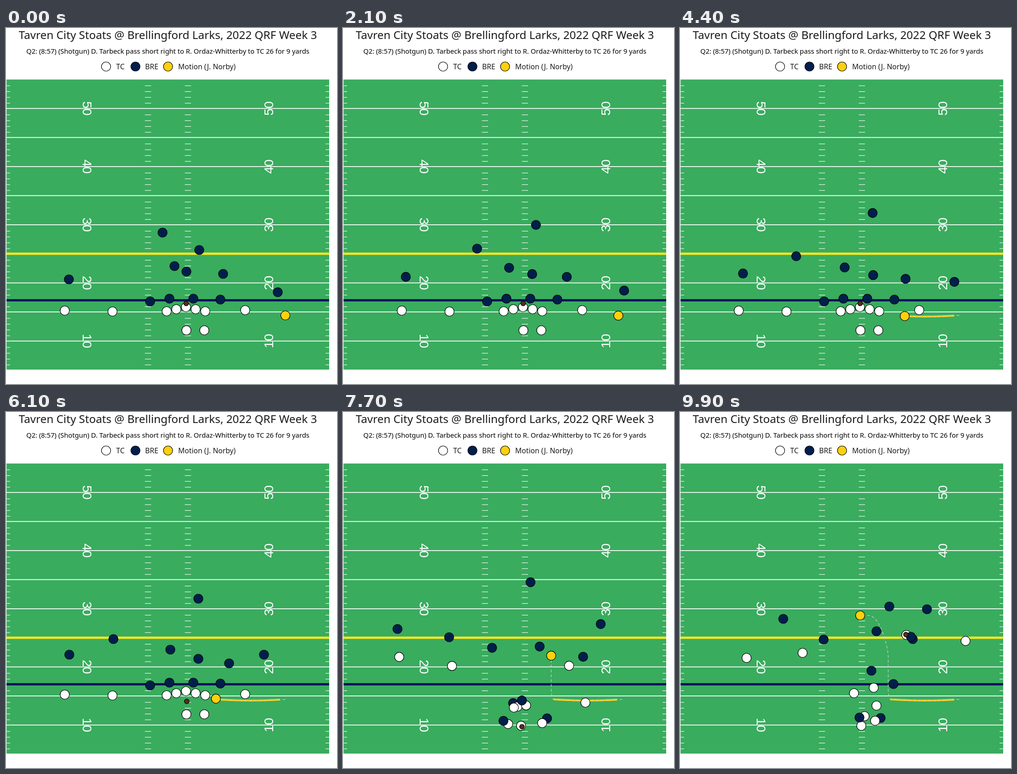
An HTML page that plays this animation: 721x776 px, repeating every 10 s.

```html
<!DOCTYPE html>
<html lang="en">
<head>
<meta charset="utf-8">
<title>Play animation</title>
<style>
  html, body { margin: 0; width: 100%; height: 100%; overflow: hidden; background: #fff; }
  svg { display: block; width: 721px; height: 776px; }
  text { font-family: "Noto Sans", sans-serif; fill: #1a1a1a; }
  .mid { text-anchor: middle; }
  .title { font-size: 24.3px; }
  .sub { font-size: 14.75px; fill: #000; }
  .key { font-size: 15.7px; }
  .num { font: 28px "Liberation Sans", Arial, sans-serif; fill: #fff; text-anchor: middle; }
  .turf { fill: #39ac5e; }
  .line { stroke: #fff; stroke-width: 1.8; }
  .tick { stroke: #fff; stroke-width: 1.1; }
  .scrimmage { stroke: #10105e; stroke-width: 5; }
  .first { stroke: #fbe723; stroke-width: 5; }
  .dot { stroke: #000; stroke-width: 1.2; }
  .off { fill: #fff; }
  .def { fill: #001f4c; }
  .mot { fill: #ffd00d; }
  .ball { fill: #55301a; }
  .trail { fill: none; stroke: #cfcfcf; stroke-width: 1.2; stroke-dasharray: 6 4.5; }
  .shift { fill: none; stroke: #ffd00d; stroke-width: 3.8; }
</style>
</head>
<body>
<svg id="stage" viewBox="0 0 721 776">
  <text class="mid title" x="352.5" y="23.5">Tavren City Stoats @ Brellingford Larks, 2022 QRF Week 3</text>
  <text class="mid sub" x="352.5" y="55.5">Q2: (8:57) (Shotgun) D. Tarbeck pass short right to R. Ordaz-Whitterby to TC 26 for 9 yards</text>
  <circle class="dot off" cx="218" cy="84" r="10"/>
  <text class="key" x="240" y="90">TC</text>
  <circle class="dot def" cx="282" cy="84" r="10"/>
  <text class="key" x="303" y="90">BRE</text>
  <circle class="dot mot" cx="353" cy="84" r="10"/>
  <text class="key" x="375" y="90">Motion (J. Norby)</text>
  <g id="field"></g>
  <g id="play"></g>
</svg>
<script>
// Times in seconds
const LOOP = 10, STEP = 0.1, END = 9.9;
const SNAP = 5.85, BREAK = 6.1, THROW = 7.8, CATCH = 8.56;
const field = document.getElementById('field');
const play = document.getElementById('play');

function add(parent, tag, attrs, text) {
  const el = document.createElementNS('http://www.w3.org/2000/svg', tag);
  for (const k in attrs) el.setAttribute(k, attrs[k]);
  if (text) el.textContent = text;
  parent.appendChild(el);
  return el;
}

// Field: yard lines, hash marks and numbers
const yardY = yard => 175.3 + (50 - yard) * 12.675;
const across = (cls, x1, x2, y) => add(field, 'line', { class: cls, x1, x2, y1: y, y2: y });

add(field, 'rect', { class: 'turf', x: 1.2, y: 112.3, width: 702.8, height: 632.3 });
for (let yard = 6; yard < 55; yard++) {
  const y = yardY(yard);
  if (yard % 5 === 0) { across('line', 1.2, 704, y); continue; }
  for (const [x, w] of [[1.5, 7.5], [302.5, 13.5], [389.5, 13.5], [696, 8]]) across('tick', x, x + w, y + 1.3);
}
for (let yard = 10; yard <= 50; yard += 10) {
  for (const [x, turn] of [[177, 90], [572, -90]]) {
    add(field, 'text', { class: 'num', y: 10, transform: `translate(${x} ${yardY(yard)}) rotate(${turn})` }, String(yard));
  }
}
across('scrimmage', 1.2, 704, 593.5);
across('first', 1.2, 704, 492);

const span = (t, a, b) => Math.min(1, Math.max(0, (t - a) / (b - a)));
const ease = (t, a, b) => { const u = span(t, a, b); return u * u * (3 - 2 * u); };
const mix = (p, q, u) => p.map((v, i) => v + (q[i] - v) * u);
const shiftBy = ([x, y], dx, dy) => [x + dx, y + dy];

// Parabola in time from a to c, passing b just after halfway
const HALF = 0.53;
function arc(a, b, c, u) {
  return a.map((v, i) => {
    const bend = (c[i] - v - (b[i] - v) / HALF) / (1 - HALF);
    return v + (c[i] - v - bend) * u + bend * u * u;
  });
}

const dots = [];
function dot(cls, r, at) {
  dots.push({ el: add(play, 'circle', { class: 'dot ' + cls, r }), at });
  return at;
}

// Last three points are the run; two more in front are a drift before the snap
function run(cls, ...points) {
  const [spot, via, stop] = points.slice(-3);
  const drift = points.length > 3;
  return dot(cls, 10, t => t < BREAK && drift
    ? arc(points[0], points[1], spot, t / BREAK)
    : arc(spot, via, stop, span(t, BREAK, END)));
}
const off = (...points) => run('off', ...points);
const def = (...points) => run('def', ...points);

const shift = add(play, 'polyline', { class: 'shift' });
const trail = add(play, 'polyline', { class: 'trail' });

// Defensive line, behind the blockers
def([356, 590], [377, 633], [417, 564]);
def([467, 592], [441, 677], [437, 667]);

// Offensive line, a shallow wedge around the centre
function blocker(i, via, stop) {
  off([392 + 21 * i, 608.5 + 4.5 * Math.abs(i)], via, stop);
}
blocker(0, [383, 642], [422, 601]);
blocker(-1, [373, 645], [379, 613]);
blocker(1, [400, 643], [428, 640]);
blocker(-2, [365, 686], [402, 663]);
blocker(2, [433, 685], [425, 673]);

// Backs and receivers
const passer = off([393, 659], [388, 687], [395, 684]);
off([432, 659], [549, 617], [622, 499]);
off([128, 616], [124, 524], [145, 536]);
off([232, 618], [241, 543], [267, 525]);
const target = off([521, 615], [489, 539], [493, 486]);

// Pass rush, in front of the blockers
def([408, 590], [395, 630], [465, 593]);
def([314, 596], [358, 682], [391, 666]);

// Linebackers
def([367, 519], [360, 523], [358, 518], [331, 510], [428, 478]);
def([473, 536], [491, 545], [486, 548], [526, 528], [507, 495]);
def([393, 531], [418, 538], [419, 538], [437, 506], [503, 490]);

// Secondary
def([137, 548], [137, 539], [138, 529], [127, 464], [225, 451]);
def([592, 576], [610, 565], [562, 529], [559, 451], [538, 430]);
def([341, 446], [271, 492], [234, 495], [239, 491], [313, 496]);
def([421, 484], [420, 412], [419, 407], [412, 372], [456, 424]);

// Man in motion: jogs across, then runs up and bends inside
const motion = dot('mot', 10, t => [
  608.5 - 150 * ease(t, 1.5, 5.6) - 5 * ease(t, SNAP, 6.6) - 61 * span(t, 7.7, END) ** 1.4,
  626.5 + 2.5 * Math.sin(Math.PI * ease(t, 1.5, 5.6)) - 183 * ease(t, 5.9, 9.4)
]);

// Ball: snapped to the passer, then thrown to the receiver
dot('ball', 5.2, t => {
  const held = mix([392.5, 600.5], shiftBy(passer(t), 2, 2), span(t, SNAP, 6.35));
  return mix(held, shiftBy(target(t), -1, -1), span(t, THROW, CATCH));
});

function path(from, to) {
  const pts = [];
  for (let t = from; t < to + STEP / 2; t += STEP) pts.push(motion(t).map(v => v.toFixed(2)).join());
  return pts.join(' ');
}

function draw(t) {
  for (const d of dots) {
    const [x, y] = d.at(t);
    d.el.setAttribute('cx', x.toFixed(2));
    d.el.setAttribute('cy', y.toFixed(2));
  }
  trail.setAttribute('points', path(0, t));
  shift.setAttribute('points', path(2.2, Math.min(t, SNAP)));
}

const start = performance.now();
function tick() {
  const t = (performance.now() - start) / 1000 % LOOP;
  draw(Math.floor(t / STEP) * STEP);
  requestAnimationFrame(tick);
}
draw(0);
requestAnimationFrame(tick);
</script>
</body>
</html>
```
